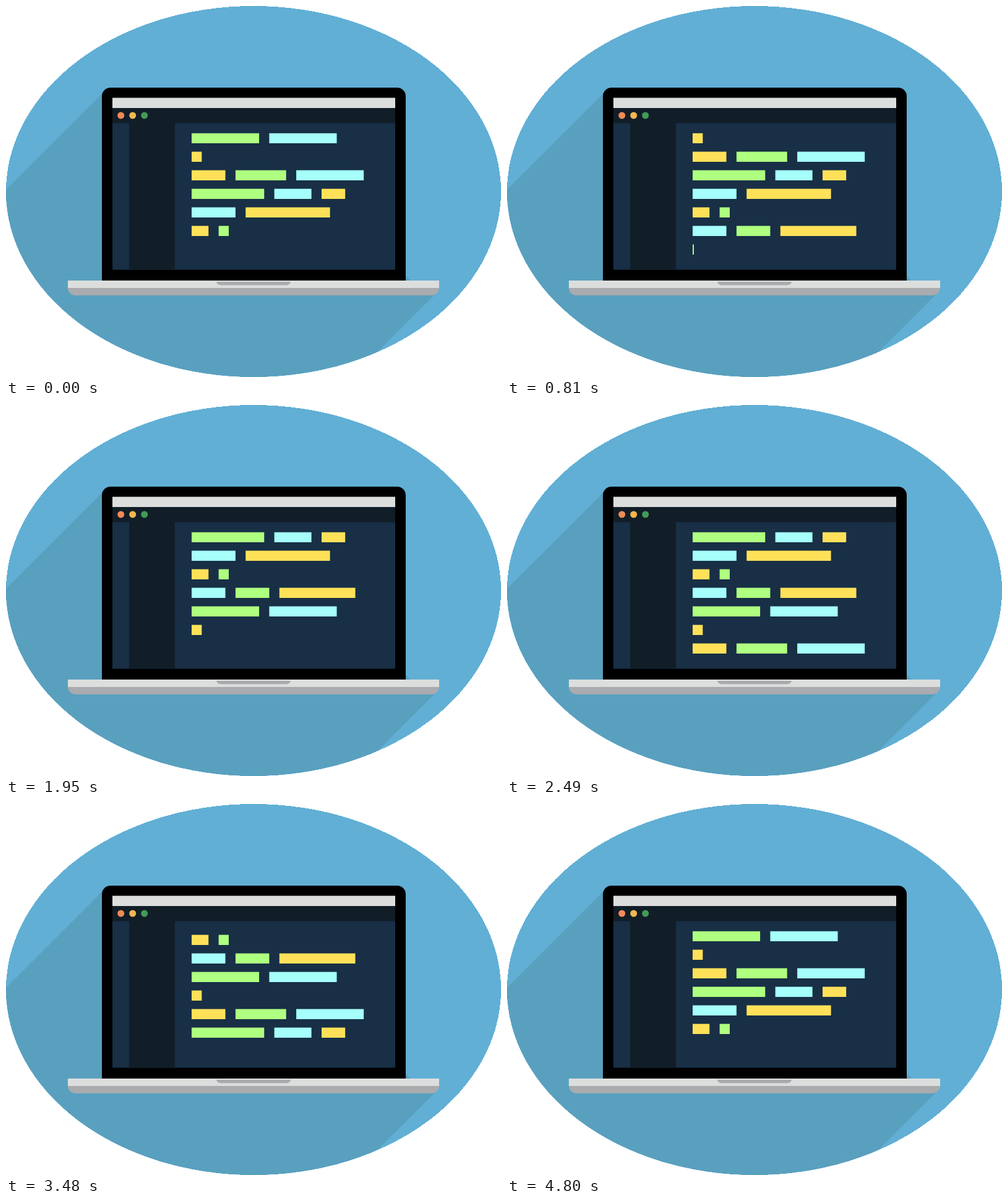
Animation of 800 by 600 pixels, one loop 4.83 s. Source, as an HTML page:

```html
<!DOCTYPE html>
<html lang="en">
<head>
<meta charset="utf-8">
<title>Typing laptop</title>
<style>
  html, body { margin: 0; width: 100%; height: 100%; overflow: hidden; background: #fff; }
  svg { display: block; width: 800px; height: 600px; }
</style>
</head>
<body>
<svg viewBox="0 0 800 600">
  <clipPath id="disc"><ellipse cx="400" cy="300" rx="400" ry="300"/></clipPath>
  <clipPath id="editor"><rect x="273" y="205.5" width="356" height="221"/></clipPath>

  <ellipse cx="400" cy="300" rx="400" ry="300" fill="#61afd5" shape-rendering="crispEdges"/>
  <path d="M159 138L0 297V600H560L693 467L654 444L646 436Z" fill="#59a0bf" clip-path="url(#disc)"/>

  <path d="M155 444V146a14 14 0 0 1 14-14H632a14 14 0 0 1 14 14V444Z"/>
  <rect x="172" y="148.5" width="457" height="278" fill="#182f46"/>
  <rect x="172" y="148.5" width="457" height="16.5" fill="#dcdedd"/>
  <path d="M172 165H629V189.500H273V426.500H199V189.500H172Z" fill="#111e28"/>
  <circle cx="185.700" cy="177" r="5.500" fill="#f28a54"/>
  <circle cx="204.700" cy="177" r="5.500" fill="#f2b74f"/>
  <circle cx="223.700" cy="177" r="5.500" fill="#439a56"/>

  <path d="M100 444H700V457H100Z" fill="#dcdedd"/>
  <path d="M100 456H700a13 12 0 0 1-13 12H113a13 12 0 0 1-13-12Z" fill="#a9abae"/>
  <path d="M340 446H460q-1 5-7 5.500H347q-6-.5-7-5.500Z" fill="#a9abae"/>

  <g id="code" clip-path="url(#editor)"></g>
</svg>
<script>
const TICK = 30, TICKS = 161, UNIT = 600 / 220, GAP = 6;
const SCROLL = 5, PAUSE = 2, ROW = 30;
const COLORS = { g: '#afff80', c: '#a6fffa', y: '#ffe159' };

// Each line: the tick its scroll begins, then its words as colour + length.
const lines = [
  [20, 'g40 c40'],
  [44, 'y6'],
  [61, 'y20 g30 c40'],
  [87, 'g43 c22 y14'],
  [113, 'c26 y50'],
  [134, 'y10 g6'],
  [156, 'c20 g20 y45']
].map(([start, text]) => {
  let x = 0, tick = SCROLL + PAUSE;
  const words = text.split(' ').map(token => {
    const length = +token.slice(1);
    const ticks = Math.max(3, Math.round(length / 8.6));
    const word = { color: COLORS[token[0]], x, length, tick, ticks };
    x += length + GAP;
    tick += ticks + PAUSE;
    return word;
  });
  return { start, words };
});

const code = document.getElementById('code');

function drawLine(line, y, tick = Infinity) {
  return line.words.filter(w => tick >= w.tick).map(w => {
    const progress = Math.min(1, (tick - w.tick) / (w.ticks - 1));
    const width = Math.max(2, w.length * UNIT * progress);
    return `<rect x="${300 + w.x * UNIT}" y="${y}" width="${width}" height="16.4" fill="${w.color}"/>`;
  }).join('');
}

function draw() {
  let tick = Math.floor(performance.now() / TICK) % TICKS;
  if (tick < lines[0].start) tick += TICKS;
  const current = lines.findLastIndex(line => line.start <= tick);
  const local = tick - lines[current].start;
  const offset = ROW * Math.max(0, 1 - (local + 1) / SCROLL);
  const top = 205.6 + offset;

  let out = drawLine(lines[current], top + 6 * ROW, local);
  for (let row = offset > 0 ? -1 : 0; row < 6; row++) {
    out += drawLine(lines[(current + row + 1) % lines.length], top + row * ROW);
  }
  code.innerHTML = out;
  requestAnimationFrame(draw);
}
draw();
</script>
</body>
</html>
```
